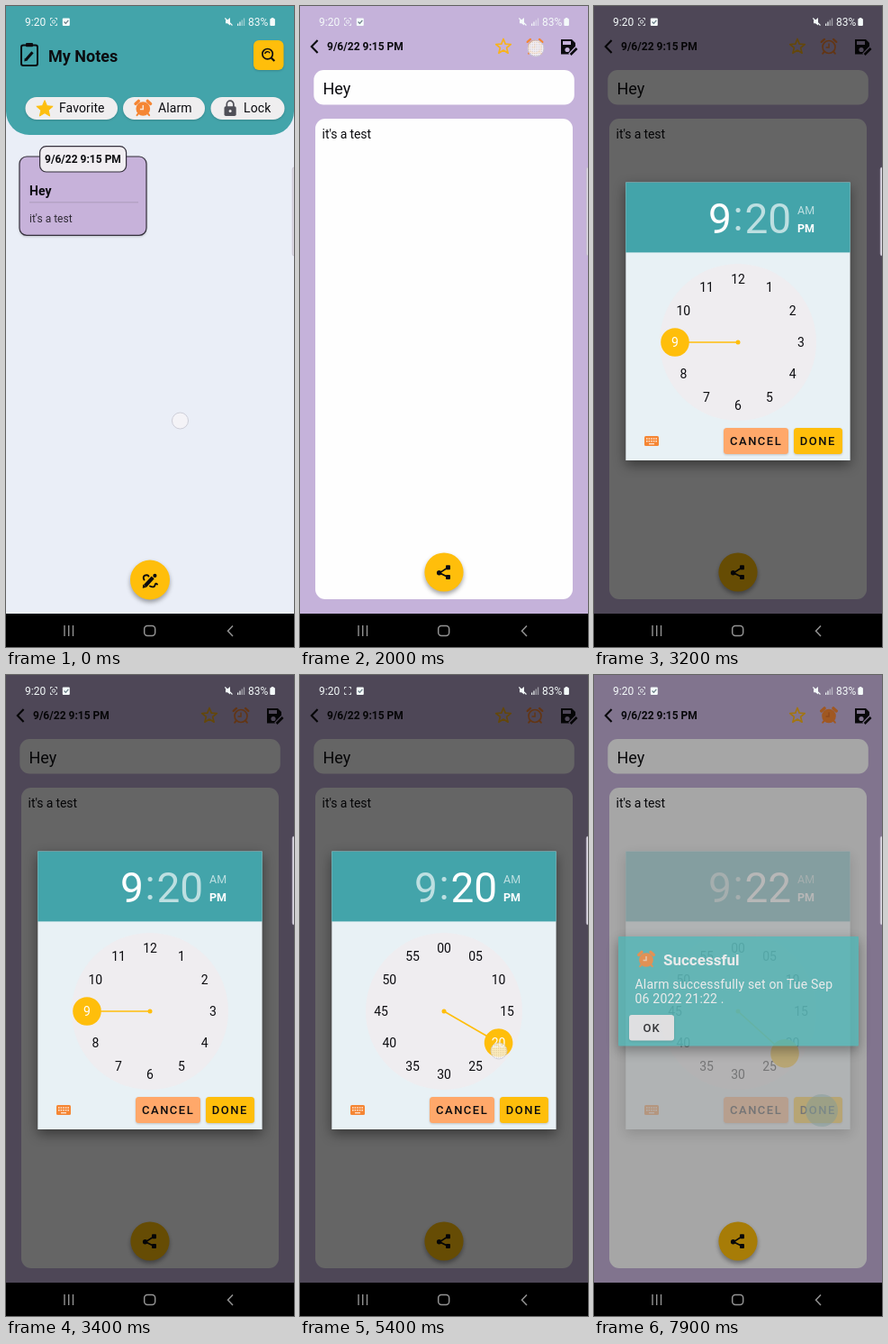
These frames come from a looping animation (320 px wide and 711 px high, 8 s). An HTML page:

```html
<!DOCTYPE html>
<html lang="en">
<head>
<meta charset="utf-8">
<title>Notes alarm</title>
<style>
html, body { margin: 0; width: 100%; height: 100%; overflow: hidden; background: #000; }
svg { display: block; width: 100vw; height: 100vh; font-family: Roboto, "Noto Sans", sans-serif; }
text { white-space: pre; }
.dialog { filter: drop-shadow(0 5px 7px rgba(0, 0, 0, .45)); }
.raised { filter: drop-shadow(0 3px 2.5px rgba(0, 0, 0, .35)); }
.soft { filter: drop-shadow(0 1px 1px rgba(0, 0, 0, .18)); }
</style>
</head>
<body>
<svg id="stage" viewBox="0 0 320 711" preserveAspectRatio="none"></svg>
<script>
const LOOP = 8000;
const TEAL = '#43a4aa', YELLOW = '#ffbe0b', ORANGE = '#f58634', PEACH = '#ffa86a';
const PURPLE = '#c5b2da', PALE = '#e8f1f5', INK = '#0c0c10';

const text = (s, x, y, size, o = {}) =>
  `<text x="${x}" y="${y}" font-size="${size}" font-weight="${o.w || 400}" fill="${o.fill || INK}"` +
  ` text-anchor="${o.at || 'start'}" letter-spacing="${o.ls || 0}" opacity="${o.op || 1}" id="${o.id || ''}">${s}</text>`;
const rect = (x, y, w, h, r, fill, more = '') =>
  `<rect x="${x}" y="${y}" width="${w}" height="${h}" rx="${r}" fill="${fill}" ${more}/>`;
const circle = (x, y, r, fill, more = '') => `<circle cx="${x}" cy="${y}" r="${r}" fill="${fill}" ${more}/>`;
const line = (d, color, w, more = '') =>
  `<path d="${d}" fill="none" stroke="${color}" stroke-width="${w}" ${more}/>`;
const shape = (d, fill, more = '') => `<path d="${d}" fill="${fill}" ${more}/>`;
const group = (id, body, more = '') => `<g id="${id}" ${more}>${body}</g>`;
const at = (x, y, body) => `<g transform="translate(${x} ${y})">${body}</g>`;
const polar = (deg, r) => {
  const a = deg * Math.PI / 180;
  return [160 + r * Math.sin(a), 373 - r * Math.cos(a)];
};
const ROUND = 'stroke-linecap="round" stroke-linejoin="round"';

function star(x, y, r, inner) {
  const p = [];
  for (let i = 0; i < 10; i++) {
    const a = i * Math.PI / 5, q = i % 2 ? inner : r;
    p.push((x + q * Math.sin(a)).toFixed(2) + ' ' + (y - q * Math.cos(a)).toFixed(2));
  }
  return 'M' + p.join('L') + 'Z';
}

function alarm(x, y, color, hands) {
  const filled = hands !== undefined;
  return at(x, y,
    line('M-8.3 -4.6L-5 -7.6M8.3 -4.6L5 -7.6', color, filled ? 3.4 : 2.2, ROUND) +
    line('M-5 6L-6.8 8.2M5 6L6.8 8.2', color, 2, ROUND) +
    circle(0, 1, 7, filled ? color : 'none', `stroke="${color}" stroke-width="1.7"`) +
    line('M0 -3V1.5H-3.4', filled ? hands : color, 1.5));
}

function button(x, y, w, label, tx, fill) {
  return rect(x, y, w, 29, 3.5, fill, 'class="soft"') +
    text(label, tx, y + 19.2, 13, { w: 500, ls: 1.5 });
}

function statusBar() {
  const c = '#f4fafa';
  return text('9:20', 21, 22, 12, { fill: c }) +
    line('M49.5 15.5V13.5H51.5M54.5 13.5H56.5V15.5M49.5 19.5V21.5H51.5M54.5 21.5H56.5V19.5', c, 1, 'opacity=".85"') +
    circle(53, 17.5, 1.7, 'none', `id="rec" stroke="${c}"`) +
    rect(62.8, 13.5, 8, 8.5, 1, c) + line('M64.6 17.5L66.4 19.3L69.3 15.8', '#667a84', 1.2) +
    shape('M244 15.5H246L249 13V21.5L246 19.3H244Z', c) + line('M243.3 13.5L251.5 21.5', c, 1.1) +
    [0, 1, 2, 3].map(i => rect(257 + i * 2.3, 19.5 - i * 2, 1.3, 2.5 + i * 2, 0, c, `opacity="${i < 2 ? .9 : .5}"`)).join('') +
    text('83%', 269, 22, 12, { fill: c }) +
    rect(293.3, 14, 5.6, 8, 1, c) + rect(294.8, 13, 2.6, 1.5, 0, c);
}

function navBar() {
  const c = '#929292';
  return rect(0, 674, 320, 37, 0, '#000') +
    line('M65 687V699M69.7 687V699M74.5 687V699', c, 1.4) +
    rect(153.7, 687.5, 12, 11, 3.4, 'none', `stroke="${c}" stroke-width="1.5"`) +
    line('M252 687.5L246.5 693.2L252 699', c, 1.5);
}

function home() {
  const chip = (x, w, label, tx) =>
    rect(x, 101, w, 25, 12.5, '#efeeef', 'class="soft"') + text(label, tx, 118.4, 14, { ls: .1 });
  const clipboard =
    rect(17, 43.5, 18, 22.5, 2.2, 'none', `stroke="${INK}" stroke-width="2"`) +
    rect(22, 41, 8, 4.2, 1, INK) +
    line('M22.3 59.6L29.5 51.2', INK, 3) + shape('M20.8 57.8L20.3 61.6L23.9 60.6Z', INK);
  const pen =
    line('M154.5 643.3L163.2 633.8', INK, 4.2) + shape('M152.2 641.6L151.8 645.8L156 644.8Z', INK) +
    line('M153.5 636.5C150.5 632 157 629.5 158.5 632.5M160 643.5C163 645 165 644.5 165.5 642.5S167 640 168 641.5', INK, 1.9, ROUND) +
    circle(165.4, 631.9, 2.1, INK);
  return rect(0, 0, 320, 674, 0, PALE, 'id="paper"') +
    shape('M0 0H320V117A26 26 0 0 1 294 143H26A26 26 0 0 1 0 117Z', TEAL) +
    clipboard + text('My Notes', 47, 61.5, 18, { w: 700 }) +
    rect(275, 38, 33.5, 33, 6, YELLOW, 'class="soft"') +
    circle(290.6, 53.2, 5.7, 'none', `stroke="${INK}" stroke-width="1.7"`) +
    line('M294.7 57.5L298.3 61', INK, 2.2) + line('M287.6 53A3 3 0 0 1 293.2 52.3', INK, 1.4) +
    chip(21.5, 102.5, 'Favorite', 59) + chip(130, 91, 'Alarm', 169) + chip(227.5, 82, 'Lock', 264) +
    shape(star(43, 114.3, 9.6, 4.4), '#fdbf10', 'stroke="#fdbf10" stroke-width="1" stroke-linejoin="round"') +
    alarm(152.3, 113, ORANGE, '#f9e4d4') +
    rect(242.5, 111.3, 13.2, 10.7, 1.8, '#505058') + circle(249.1, 116.6, 1.5, '#efeeef') +
    line('M245.3 112V109A3.8 3.8 0 0 1 252.9 109V112', '#505058', 1.7) +
    rect(15, 167, 141, 87, 8, '#c7b2da', 'id="card" class="soft" stroke="#35303c" stroke-width="1.2"') +
    '<clipPath id="cardClip"><rect x="15.6" y="167.6" width="139.8" height="85" rx="7.5"/></clipPath>' +
    `<g clip-path="url(#cardClip)">${circle(127, 220, 0, '#fff', 'id="cardRipple" opacity=".14"')}</g>` +
    rect(37.6, 155.6, 96, 28.4, 7, '#f0edf1', 'stroke="#35303c" stroke-width="1.2"') +
    text('9/6/22 9:15 PM', 85.5, 174.4, 12, { w: 700, at: 'middle' }) +
    group('cardText', text('Hey', 26, 210, 14, { w: 700 }) + rect(26, 217.3, 121, 1, 0, '#ab9cbb')) +
    text("it's a test", 26, 240, 12, { fill: '#302b36', id: 'cardBody' }) +
    circle(160, 636.5, 22, YELLOW, 'class="raised"') + pen;
}

function editor() {
  const save = shape('M290 37H302L306 41V47L299 53.5H290Z', INK) +
    rect(292, 39, 9, 4, 0, PURPLE) + circle(297, 48.5, 2.6, PURPLE) +
    line('M299.8 54.3L307.8 46.2', PURPLE, 4.6) + line('M300.6 54L307.6 47', INK, 2.6);
  return rect(0, 0, 320, 674, 0, PURPLE) +
    line('M19.6 38L12.8 45L19.6 52', INK, 2.1) +
    text('9/6/22 9:15 PM', 30, 49.3, 12, { w: 700 }) +
    line(star(226, 45.2, 8.7, 3.8), '#f8b31c', 1.7, 'stroke-linejoin="round"') +
    group('alarmOff', alarm(261, 44.5, ORANGE)) + group('alarmOn', alarm(261, 44.5, ORANGE, '#d9702a')) + save +
    rect(15.3, 71, 289.5, 38.5, 11, '#fefefe') + text('Hey', 25.5, 97.7, 18) +
    rect(17, 125, 286, 533, 11, '#fefefe') + text("it's a test", 24.6, 147.4, 14, { ls: -.1 }) +
    circle(160, 628, 21.6, YELLOW, 'class="raised"') +
    line('M164.5 622.8L155 628.8L164.5 633.5', INK, 1.6) +
    circle(154.6, 628.8, 2.7, INK) + rect(162, 620.3, 5, 5, 1, INK) + rect(162, 631, 5, 5, 1, INK);
}

function dateDialog() {
  const col = i => 66.5 + 30.9 * i;
  let days = [...'SMTWTFS'].map((d, i) => text(d, col(i), 299, 9.5, { at: 'middle', fill: '#ee8a48' })).join('');
  days += circle(128.4, 356.3, 15.7, YELLOW);
  for (let d = 1; d <= 30; d++) {
    const n = d + 3;
    days += text(d, col(n % 7), 329 + 31.1 * Math.floor(n / 7), 11,
      { at: 'middle', fill: d === 6 ? '#fff' : INK });
  }
  return rect(35.3, 160, 249.3, 380, 0, PALE, 'class="dialog"') + rect(35.3, 160, 249.3, 73.3, 0, TEAL) +
    text('2022', 54, 185, 13.5, { fill: '#fff', op: .72 }) +
    text('Tue, Sep 6', 54, 213, 26, { w: 500, fill: '#fff' }) +
    line('M68.7 255.6L64.6 259.8L68.7 264M251.7 255.6L255.8 259.8L251.7 264', INK, 1.6) +
    text('September 2022', 160, 264, 12, { w: 500, at: 'middle' }) + days +
    button(147, 504, 72.3, 'CANCEL', 154, PEACH) + button(225, 504, 51, 'OK', 240.5, YELLOW);
}

function dial(id, labels, deg, picked) {
  const put = (i, fill) => {
    const [x, y] = polar(i * 30, 70);
    return text(labels[i], x, y + 5, 14, { at: 'middle', fill });
  };
  const hand = group(id + 'Hand', line('M160 373V303', YELLOW, 1.6) + circle(160, 303, 15.8, YELLOW),
    `transform="rotate(${deg} 160 373)"`);
  return group(id, labels.map((_, i) => put(i, INK)).join('') + hand +
    circle(160, 373, 2.5, YELLOW) + group(id + 'Pick', put(picked, '#fff')));
}

function timeDialog() {
  const hours = Array.from({ length: 12 }, (_, i) => i || 12);
  const minutes = hours.map((_, i) => String(i * 5).padStart(2, '0'));
  const big = { fill: '#fff' };
  const keys = rect(56, 477, 16, 11, 1.5, ORANGE) +
    line('M58 480H70M58 482.8H70', '#fde6d5', 1.5, 'stroke-dasharray="1.6 1"') + line('M61 485.7H67', '#fde6d5', 1.3);
  return rect(35.3, 195.6, 249.3, 308.4, 0, PALE, 'class="dialog"') + rect(35.3, 195.6, 249.3, 77.8, 0, TEAL) +
    text('9', 127, 251.7, 46, { ...big, id: 'hourText' }) +
    text(':', 160, 249, 46, { ...big, at: 'middle', op: .65 }) +
    text('20', 167.5, 251.7, 46, { ...big, id: 'minuteText' }) +
    text('AM', 226, 231, 12.5, { fill: '#fff', op: .65 }) + text('PM', 226, 251.4, 12.5, { w: 700, fill: '#fff' }) +
    circle(160, 373, 87, '#efedf0') + dial('hourDial', hours, 270, 9) + dial('minuteDial', minutes, 120, 4) +
    keys + button(144, 468, 72, 'CANCEL', 151, PEACH) + button(222, 468, 54, 'DONE', 228.8, YELLOW) +
    circle(253, 483, 14, '#3f9d92', 'id="doneRipple"');
}

function successDialog() {
  const white = { fill: '#fff' };
  return rect(27, 290, 267, 121.5, 1, '#49b7b7', 'class="dialog"') +
    alarm(58, 315, ORANGE, '#f3cfae') +
    text('Successful', 77, 321.8, 17, { ...white, w: 700 }) +
    text('Alarm successfully set on Tue Sep', 45.5, 348.3, 14, { ...white, ls: .2 }) +
    text('06 2022 21:22 .', 45.5, 364.3, 14, { ...white, ls: .2 }) +
    rect(39, 377, 50, 28.5, 3, '#f0eff1', 'class="soft"') + text('OK', 54.5, 396.2, 13, { w: 500, ls: 1 });
}

const dim = id => rect(0, 0, 320, 674, 0, '#000', `id="${id}"`);
document.getElementById('stage').innerHTML =
  '<defs><pattern id="weave" width="2" height="2" patternUnits="userSpaceOnUse">' +
  rect(0, 0, 2, 2, 0, '#fafafa') + rect(0, 0, 1, 1, 0, '#d6d0cc') + '</pattern></defs>' +
  group('home', home()) + group('editor', editor()) + dim('shade') +
  group('datePick', dateDialog()) + group('timePick', timeDialog()) + dim('shade2') +
  group('success', successDialog()) +
  rect(318.2, 179, 6, 98, 2, '#dcd9e2', 'stroke="#bdb5c8" stroke-width=".6"') +
  statusBar() + navBar() + circle(0, 0, 9, '#f6f4f8', 'id="touch" stroke="#c8c8d2" stroke-width="1"');

const el = {};
document.querySelectorAll('[id]').forEach(n => { if (n.id) el[n.id] = n; });

const clamp = v => Math.max(0, Math.min(1, v));
const ramp = (t, a, b) => clamp((t - a) / (b - a));
const ease = (t, a, b) => { const p = ramp(t, a, b); return 1 - (1 - p) ** 3; };
const mix = (a, b, p) => a + (b - a) * p;
const set = (n, k, v) => el[n].setAttribute(k, v);
const show = (n, o) => { set(n, 'opacity', o); el[n].style.display = o > 0 ? '' : 'none'; };

// start, end, from x, y, to x, y, opacity
const touches = [
  [0, 150, 193.5, 460, 193.5, 460, .85],
  [900, 1150, 127.5, 220, 127.5, 220, .55],
  [1900, 2100, 262, 47, 262, 47, .85],
  [2750, 2900, 251, 519, 251, 519, .75],
  [4200, 4400, 92, 376, 92, 376, .75],
  [5200, 6300, 221, 417, 213, 429, .75],
  [7400, 7600, 253, 483, 253, 483, .75]
];

function draw(t) {
  const press = ramp(t, 0, 1000);
  set('paper', 'fill', `rgb(${mix(234, 232, press)} ${mix(238, 241, press)} ${mix(247, 245, press)})`);
  set('card', 'height', mix(87.3, 86, press));
  set('cardText', 'transform', `translate(0 ${-press})`);
  set('cardBody', 'y', mix(240, 238.3, press));
  set('cardRipple', 'r', 130 * ease(t, 850, 1200));

  const open = ease(t, 1100, 1480);
  show('editor', open);
  set('editor', 'transform', `translate(${(1 - open) * 32} 0)`);
  show('home', open < 1 ? 1 : 0);

  const leave = ramp(t, 7640, 7980);
  const dateOut = ramp(t, 2880, 3060), timeIn = ease(t, 2960, 3200);
  const gap = .12 * ramp(t, 2880, 2980) * (1 - timeIn);
  show('shade', .6 * ease(t, 2100, 2350) * (1 - gap) * (1 - leave * .77));
  show('datePick', ease(t, 2120, 2380) * (1 - dateOut));
  show('timePick', timeIn * (1 - leave * .9));

  const toMinutes = ramp(t, 4400, 4650);
  const minute = t < 5650 ? 20 : t < 5950 ? 21 : 22;
  set('hourText', 'opacity', mix(1, .65, toMinutes));
  set('minuteText', 'opacity', mix(.65, 1, toMinutes));
  el.minuteText.textContent = minute;
  show('hourDial', 1 - toMinutes);
  show('minuteDial', toMinutes);
  set('minuteDialHand', 'transform', `rotate(${minute * 6} 160 373)`);
  show('minuteDialPick', minute === 20 ? 1 : 0);

  show('doneRipple', t > 7400 ? .5 : 0);
  set('doneRipple', 'r', 6 + 12 * ease(t, 7400, 7800));
  const done = t >= 7600;
  show('alarmOn', done ? 1 : 0);
  show('alarmOff', done ? 0 : 1);
  const arrive = ramp(t, 7680, 7980);
  show('shade2', .18 * arrive);
  show('success', arrive);

  show('rec', t % 1600 >= 500 && t % 1600 < 800 ? 0 : .85);

  const tap = touches.find(p => t >= p[0] && t < p[1]);
  show('touch', tap ? tap[6] : 0);
  if (tap) {
    const p = ramp(t, tap[0] + 220, tap[1] - 250);
    set('touch', 'cx', mix(tap[2], tap[4], p));
    set('touch', 'cy', mix(tap[3], tap[5], p));
    set('touch', 'fill', t < 1500 ? '#f6f4f8' : 'url(#weave)');
  }
}

const start = performance.now();
function tick() {
  draw((performance.now() - start) % LOOP);
  requestAnimationFrame(tick);
}
tick();
</script>
</body>
</html>
```
